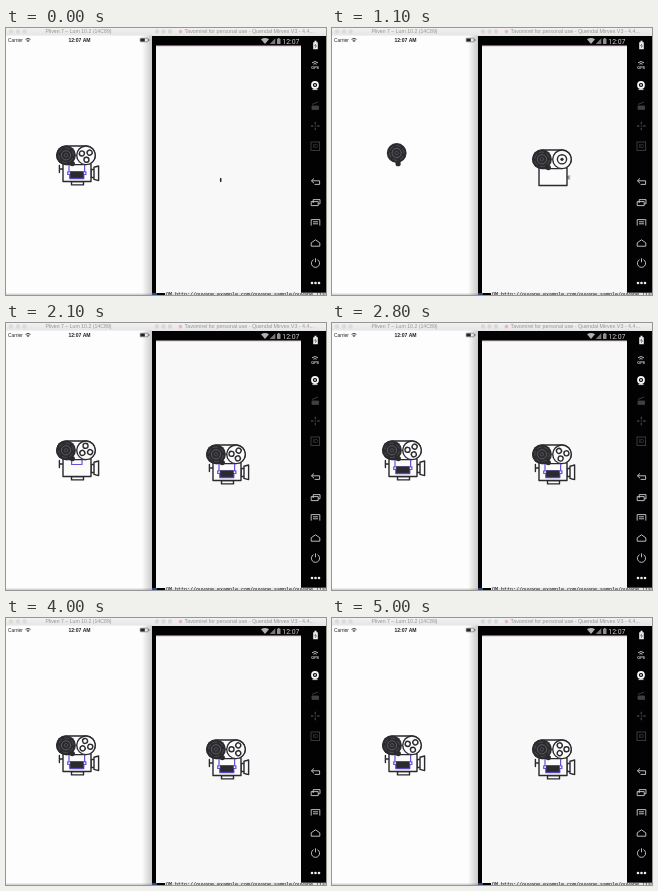
Recreate the animation shown at these times as an HTML page. Size 320x267 px, loop 5100 ms.

```html
<!DOCTYPE html>
<html lang="en">
<head>
<meta charset="utf-8">
<title>Camera loader on two phones</title>
<style>
  html, body { margin: 0; width: 100%; height: 100%; overflow: hidden; background: #fdfdfd; }
  svg { display: block; width: 320px; height: 267px; }
  text { font-family: "Liberation Sans", Arial, sans-serif; }
  .roboto { font-family: Roboto, sans-serif; }
  .mono { font-family: "Liberation Mono", monospace; }
  .ink { fill: none; stroke: #29292e; stroke-width: 1.4; stroke-linejoin: round; stroke-linecap: round; }
  .paper { fill: #fbfbfb; }
  .dark { fill: #2b2b2f; }
  .film { fill: none; stroke: #6a4fd8; stroke-width: 1.2; stroke-linejoin: round; }
  .tool { fill: none; stroke: #d0d0d0; stroke-width: .9; }
  .off { stroke: #404040; }
</style>
</head>
<body>
<svg viewBox="0 0 320 267">
  <defs>
    <linearGradient id="bar" x2="0" y2="1">
      <stop stop-color="#f2f0f1"/><stop offset="1" stop-color="#e6e4e5"/>
    </linearGradient>
    <linearGradient id="shade">
      <stop stop-color="#000" stop-opacity="0"/><stop offset="1" stop-color="#000" stop-opacity=".2"/>
    </linearGradient>
  </defs>

  <!-- left window -->
  <rect width="320" height="267" fill="#fdfdfd"/>
  <rect width="146" height="7.5" fill="url(#bar)"/>
  <g fill="#dcdadb"><circle cx="5" cy="3.5" r="2.2"/><circle cx="12" cy="3.5" r="2.2"/><circle cx="18.5" cy="3.5" r="2.2"/></g>
  <text x="72.5" y="5.4" font-size="5.2" fill="#969696" text-anchor="middle">Pliven 7 – Lum 10.2 (14C89)</text>
  <text x="2" y="13.9" font-size="4.9" fill="#222">Carrier</text>
  <g fill="none" stroke="#222" stroke-width=".8">
    <path d="M19.5 11.4q2.5-2.2 5 0M20.6 12.6q1.4-1.2 2.8 0"/>
    <circle cx="22" cy="13.5" r=".3"/>
    <rect x="134.2" y="10.2" width="8" height="3.6" rx=".6" stroke-width=".4"/>
  </g>
  <path d="M134.4 10.4h4.4v3.2h-4.4zM142.6 11.3h.7v1.4h-.7z" fill="#222"/>
  <text x="73.5" y="13.9" font-size="5.1" font-weight="bold" fill="#222" text-anchor="middle">12:07 AM</text>
  <rect y="265.5" width="146" height="1.5" fill="#d5d5d5"/>
  <rect x="136" y="7.5" width="10" height="259.5" fill="url(#shade)"/>

  <!-- right window -->
  <rect x="146" width="174" height="8" fill="url(#bar)"/>
  <g fill="#d9d7d8"><circle cx="151" cy="3.5" r="2.2"/><circle cx="157.5" cy="3.5" r="2.2"/><circle cx="164" cy="3.5" r="2.2"/></g>
  <circle cx="174.5" cy="3.6" r="1.8" fill="#e7b4ca"/>
  <text x="178.5" y="5.4" font-size="5.35" fill="#969696">Tavomirel for personal use - Quendal Mirvex V3 - 4.4...</text>
  <rect x="146" y="8" width="174" height="259" fill="#020202"/>
  <rect x="150" y="18" width="145" height="247" fill="#f8f8f8"/>
  <rect x="150" y="17.5" width="145" height="1" fill="#d9c4d5"/>
  <path d="M255 11.2q4-2.6 8 0l-4 4.8z" fill="#b0b0b0"/>
  <path d="M269.3 10.2v5.8h-5.6z" fill="#777"/>
  <path d="M271 10.8h1v-.7h1.5v.7h1v5.2h-3.5z" fill="#909090"/>
  <text class="roboto" x="276.3" y="15.7" font-size="6.9" fill="#cfcfcf">12:07</text>
  <rect x="159" y="264.7" width="161" height="2.3" fill="#e2e2e2"/>
  <text class="mono" x="160" y="268.2" font-size="5" fill="#111">OM http://ouvane.example.com/ouvane_sample/ouvane_list/</text>
  <rect x="146" y="265" width="5" height="2" fill="#31477e"/>

  <!-- toolbar -->
  <g class="tool">
    <path d="M307.2 14.2h1.3v-1.4h2v1.4h1.3v7h-4.6z" fill="#eee" stroke="none"/>
    <path d="M309.8 15.8l-1.1 2h1.7l-1.1 2" stroke="#222" stroke-width=".6"/>
    <path d="M306 34.8q3-2.6 6 0M307.4 36.2q1.6-1.3 3.2 0"/>
    <circle cx="309" cy="57" r="3" stroke="#f4f4f4" stroke-width="1.8"/>
    <circle cx="309" cy="57" r=".9" fill="#eee" stroke="none"/>
    <path d="M306.5 61.6h5" stroke="#eee"/>
    <g class="off">
      <path d="M306 78h6.6v3.4h-6.6z" fill="#404040"/><path d="M306 76.4l6-2.4"/>
      <path d="M309.3 93.8v2.4M309.3 99.8v2.4M305 98h2.4M311.2 98h2.4" stroke-width="1.3"/>
      <circle cx="309.3" cy="98" r=".4"/>
      <rect x="305" y="114" width="8.6" height="8.4"/>
    </g>
    <path d="M308 150.4l-2.6 2.4 2.6 2.4M305.6 152.8h8v3.6h-5"/>
    <path d="M307.2 175v-3.4h6.8v4.2h-1.6M305.2 173.6h7v4h-7z"/>
    <path d="M305.2 197.6v-6h8.6v6M307 193.8h5M307 195.8h5"/>
    <path d="M305.2 218.2v-3.4l4.3-3 4.3 3v3.4z"/>
    <path d="M307.6 231.6a4.1 4.1 0 1 0 3.8 0M309.5 230.3v4"/>
  </g>
  <text x="309.2" y="41" font-size="3.7" font-weight="bold" fill="#ddd" text-anchor="middle">GPS</text>
  <text x="309.3" y="120.1" font-size="5" fill="#505050" text-anchor="middle">ID</text>
  <g fill="#eee"><circle cx="306" cy="255" r="1.3"/><circle cx="309.5" cy="255" r="1.3"/><circle cx="313" cy="255" r="1.3"/></g>

  <g id="left"></g>
  <g id="right" transform="translate(150 4)"></g>
</svg>

<script>
const LOOP = 5100, STEP = 100;

const clamp = v => Math.max(0, Math.min(1, v));
const ramp = (p, a, b) => clamp((p - a) / (b - a));
const ease = (p, a, b) => { const k = ramp(p, a, b); return k * k * (3 - 2 * k); };
const pop = (p, a, b) => {
  const k = ramp(p, a, b) - 1;
  return k === -1 ? 0 : 1 + 2.7 * k ** 3 + 1.7 * k ** 2;
};
const mix = (a, b, k) => a + (b - a) * k;

const holes = [30, 150, 270].map(a =>
  `<circle class="ink" r="2.5" cy="-4.5" transform="rotate(${a})" stroke-width="1.2"/>`).join('');

const markup = `
  <g data-p="knob"><path class="ink" d="M57 141h-3M53.4 137.5v7"/></g>
  <g data-p="base"><rect class="ink paper" x="65.5" y="153.5" width="12" height="3.4"/></g>
  <g data-p="lens"><path class="ink paper" d="M85 141.5h3v8h-3zM88 139.2l4.6-1.2v14.6l-4.6-1.2z"/></g>
  <rect data-p="body" class="ink paper" x="57" y="135.8" width="28"/>
  <rect data-p="housing" class="ink paper" rx="9.3" height="18.6"/>
  <g data-p="second">
    <circle class="ink paper" r="9.3"/>
    <g data-p="ring"><circle class="ink" r="4.6"/><circle class="dark" r="1.6"/></g>
    <g data-p="holes">${holes}</g>
  </g>
  <path data-p="film" class="film"/>
  <rect data-p="screen" class="dark" x="-6.7" y="-3.3" width="13.4" height="6.6"
    stroke="#3d2f80" stroke-width=".6"/>
  <circle data-p="bead" class="dark"/>
  <g data-p="reel">
    <ellipse data-p="disc" class="dark"/>
    <g data-p="detail" fill="none" stroke="#77777c">
      <circle r="7.3" stroke-width=".5" stroke-dasharray="5 2.6"/>
      <circle r="4.6" stroke-width=".8"/>
      <circle r="1.7" stroke-width=".6"/>
    </g>
  </g>`;

// U-shaped strip hanging between the reels, with side tabs at half depth
function filmPath(half, depth, tab) {
  const mid = depth * .5;
  const side = `v${mid} h${tab} v${depth * .2} h${-1.6 * tab} v${depth * .3}`;
  const back = `v${-depth * .3} h${-1.6 * tab} v${-depth * .2} h${tab} v${-mid}`;
  return `M${70.8 + half} 137 ${side} h${1.2 * tab - 2 * half} ${back}`;
}

function makeCamera(id) {
  const root = document.getElementById(id);
  root.innerHTML = markup;
  const part = {};
  root.querySelectorAll('[data-p]').forEach(el => part[el.dataset.p] = el);
  const set = (name, attrs) => {
    for (const key in attrs) part[name].setAttribute(key, attrs[key]);
  };
  const show = (name, on) => set(name, { visibility: on ? 'inherit' : 'hidden' });

  return p => {
    root.setAttribute('visibility', p < 0 ? 'hidden' : 'visible');
    if (p < 0) return;

    // a drop rises, swells into the reel, then slides left
    const slide = ease(p, 450, 750);
    const grow = pop(p, 0, 300);
    const x = mix(64.7, 60, slide);
    const y = mix(mix(148, 125, ease(p, 0, 200)), 127.3, slide);
    const turn = p * .06;
    set('reel', { transform: `translate(${x} ${y})` });
    set('disc', { rx: mix(.9, 9.9, grow), ry: mix(2.2, 9.9, grow) });
    set('detail', { transform: `rotate(${turn})`, opacity: .75 * ramp(p, 200, 300) });
    set('bead', {
      cx: x + mix(1.4, 6.3, slide), cy: y + mix(10.7, 8.3, slide), r: 2.6 * ramp(p, 200, 300)
    });

    // second reel
    const sx = mix(x, 80, pop(p, 500, 850));
    show('housing', p > 450);
    set('housing', { x: x - 9.3, y: y - 9.3, width: Math.max(18.6, sx - x + 18.6) });
    show('second', p > 500);
    set('second', { transform: `translate(${sx} ${y})` });
    const swap = ease(p, 1100, 1350);
    set('ring', { transform: `scale(${1 - swap})`, opacity: swap < 1 ? 1 : 0 });
    set('holes', { transform: `rotate(${turn}) scale(${swap})`, opacity: swap > 0 ? 1 : 0 });

    // body and attachments
    const lens = mix(.1, 1, pop(p, 1090, 1350));
    show('body', p > 650);
    set('body', { height: Math.max(0, 17.7 * pop(p, 650, 1000)) });
    show('lens', p > 1050);
    set('lens', { transform: `translate(86 145.5) scale(${lens}) translate(-86 -145.5)` });
    show('base', p > 1100);
    set('base', { transform: `translate(0 ${mix(-5, 0, pop(p, 1100, 1350))})` });
    show('knob', p > 1150);
    set('knob', { transform: `translate(${mix(5, 0, pop(p, 1150, 1380))} 0)` });

    // film strip and viewing window
    const open = ease(p, 1400, 1950);
    show('film', p > 1300);
    set('film', {
      d: filmPath(mix(5.2, 7.8, open), mix(4.5, 13.6, open), 1.3 * open),
      opacity: ramp(p, 1300, 1400)
    });
    show('screen', p > 1600);
    set('screen', { transform: `translate(70.8 146.7) scale(${pop(p, 1600, 1950)})` });
  };
}

const drawLeft = makeCamera('left');
const drawRight = makeCamera('right');
const start = performance.now();

function frame() {
  const now = Math.max(0, performance.now() - start) % LOOP;
  const t = Math.floor(now / STEP) * STEP;
  drawLeft(t < 200 ? t + 4400 : t - 700);
  drawRight(t);
  requestAnimationFrame(frame);
}
frame();
</script>
</body>
</html>
```
